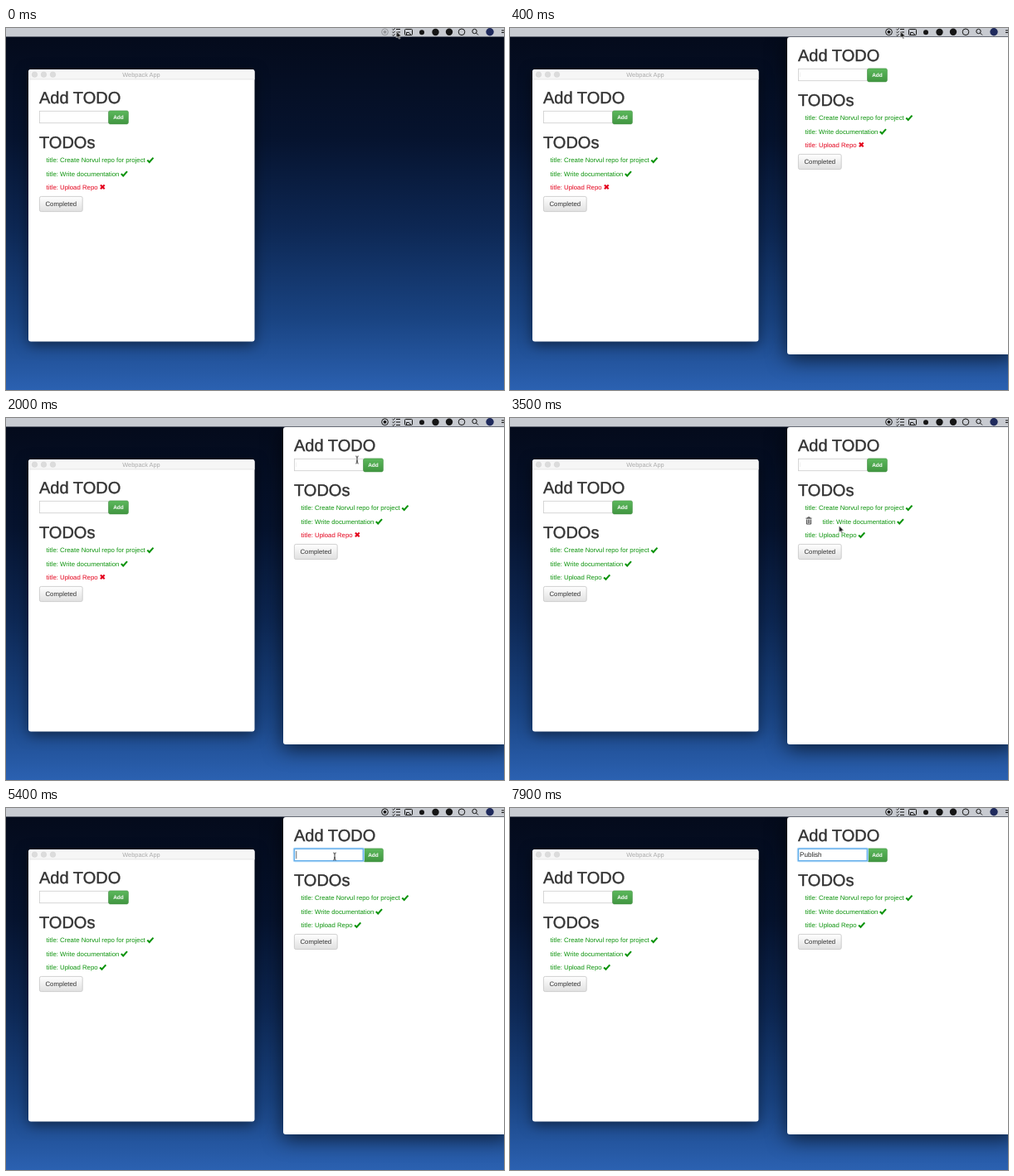
An HTML page that plays this animation: 600 px wide and 437 px high, repeating every 8 s.

```html
<!DOCTYPE html>
<html lang="en">
<head>
<meta charset="utf-8">
<title>Todo menu bar app</title>
<style>
html, body { margin: 0; width: 100%; height: 100%; overflow: hidden; }
svg { display: block; }
text { font: 7.8px "Liberation Sans", Arial, sans-serif; text-rendering: geometricPrecision; }
.h1 { font-size: 20px; fill: #333; stroke: #333; stroke-width: .4px; }
.green { color: #0b930b; }
.row { fill: currentColor; }
.mark { fill: none; stroke: currentColor; stroke-width: 2.1; }
.window { filter: drop-shadow(0 4px 8px rgba(0,0,0,.5)); }
.popup { filter: drop-shadow(0 5px 12px rgba(0,0,0,.65)); }

/* Every animated part shares one 8 s clock; most states switch hard. */
.a { animation: 8s step-end -20ms infinite; }
.show { animation-name: show; }
.record { animation-name: record; }
.pressed { animation-name: pressed; }
.status { animation-name: status; }
.cross { animation-name: cross; }
.check { animation-name: check; }
.upload { animation-name: upload; }
.write { animation-name: write; }
.bin-upload { animation-name: bin-upload; }
.bin-write { animation-name: bin-write; }
.focus { animation-name: focus; }
.type { animation-name: type; }
.caret { animation-name: caret; }
.ring { animation-name: ring; }
.arrow { animation-name: arrow; }
.beam { animation-name: beam; }
.pointer { animation-name: pointer; animation-timing-function: ease-in-out; }

@keyframes show { 0% { opacity: 0 } 5%, 100% { opacity: 1 } }
@keyframes record { 0% { opacity: .3 } 1.25%, 100% { opacity: 1 } }
@keyframes pressed { 0% { opacity: 0 } 2.5% { opacity: 1 } 5%, 100% { opacity: 0 } }
@keyframes status { 0% { color: #e3001b } 38.75%, 100% { color: #0b930b } }
@keyframes cross { 0% { opacity: 1 } 38.75%, 100% { opacity: 0 } }
@keyframes check { 0% { opacity: 0 } 38.75%, 100% { opacity: 1 } }
@keyframes upload { 0% { transform: none } 31.25% { transform: translateX(21px) } 43.75%, 100% { transform: none } }
@keyframes write { 0% { transform: none } 43.75% { transform: translateX(21px) } 45%, 100% { transform: none } }
@keyframes bin-upload { 0% { opacity: 0 } 31.25% { opacity: 1 } 43.75%, 100% { opacity: 0 } }
@keyframes bin-write { 0% { opacity: 0 } 43.75% { opacity: 1 } 45%, 100% { opacity: 0 } }
@keyframes focus { 0% { opacity: 0 } 53.75%, 100% { opacity: 1 } }
@keyframes type {
  0% { transform: none }
  71.25% { transform: translateX(5.5px) }
  73.75% { transform: translateX(10px) }
  76.25% { transform: translateX(14.5px) }
  78.75% { transform: translateX(16.3px) }
  81.25% { transform: translateX(18.1px) }
  83.75% { transform: translateX(22.2px) }
  86.25%, 100% { transform: translateX(27px) }
}
@keyframes caret {
  0% { opacity: 0 } 53.75% { opacity: 1 } 58.75% { opacity: 0 }
  65% { opacity: 1 } 92.5%, 100% { opacity: 0 }
}
@keyframes ring {
  0% { opacity: 0 } 1.25% { opacity: 1 } 5% { opacity: 0 }
  36.25% { opacity: 1 } 40% { opacity: 0 }
  52.5% { opacity: 1 } 56.25%, 100% { opacity: 0 }
}
@keyframes arrow {
  0% { opacity: 1 } 21.25% { opacity: 0 } 26.25% { opacity: 1 } 45%, 100% { opacity: 0 }
}
@keyframes beam {
  0% { opacity: 0 } 21.25% { opacity: 1 } 26.25% { opacity: 0 }
  45% { opacity: 1 } 71.25%, 100% { opacity: 0 }
}
@keyframes pointer {
  0%, 13.75% { transform: translate(470.5px, 4px) }
  22.5%, 26.25% { transform: translate(423px, 50.5px) }
  31.25%, 42.5% { transform: translate(441px, 138.5px) }
  43.75%, 44.25% { transform: translate(396.5px, 130px) }
  46.25%, 100% { transform: translate(396px, 58.5px) }
}
</style>
</head>
<body>
<svg width="600" height="437" viewBox="0 0 600 437">
  <defs>
    <linearGradient id="sky" x2="0" y2="1">
      <stop stop-color="#040a1a"/>
      <stop offset=".3" stop-color="#06132e"/>
      <stop offset=".55" stop-color="#0d2753"/>
      <stop offset=".8" stop-color="#194381"/>
      <stop offset="1" stop-color="#2b61b1"/>
    </linearGradient>
    <linearGradient id="leaf" x2="0" y2="1">
      <stop stop-color="#5cb85c"/><stop offset="1" stop-color="#419641"/>
    </linearGradient>
    <linearGradient id="steel" x2="0" y2="1">
      <stop stop-color="#fff"/><stop offset="1" stop-color="#e0e0e0"/>
    </linearGradient>

    <path id="tick" class="mark" d="M.8 .4L3.2 2.7L8 -2.6"/>
    <path id="times" class="mark" d="M.9 -2.4L5.7 2.4M5.7 -2.4L.9 2.4"/>
    <g id="bin" fill="none" stroke="#333">
      <path d="M0 1.6H7M2.3 1.4V.4H4.7V1.4" stroke-width="1"/>
      <path d="M.9 3V8.5H6.1V3M2.7 3V7.5M4.3 3V7.5" stroke-width=".9"/>
    </g>

    <g id="page">
      <text class="h1" x="40" y="91.2">Add TODO</text>
      <rect x="40.5" y="100.3" width="83" height="14.4" fill="#fff" stroke="#ccc" stroke-width=".8"/>
      <rect x="123.6" y="99.9" width="23.8" height="16" rx="1.8" fill="url(#leaf)" stroke="#3e8f3e" stroke-width=".6"/>
      <text x="135.5" y="110.3" text-anchor="middle" fill="#fff" style="font-size:6.5px;font-weight:700">Add</text>
      <text class="h1" x="40" y="145.4">TODOs</text>
      <g class="row green">
        <text x="48.6" y="162.2">title: Create Norvul repo for project</text>
        <use href="#tick" x="169.5" y="159.2"/>
      </g>
      <rect x="40.4" y="203.4" width="51.8" height="18.2" rx="2" fill="url(#steel)" stroke="#c4c4c4" stroke-width=".8"/>
      <text x="66.3" y="215.3" text-anchor="middle" fill="#333">Completed</text>
    </g>
    <g id="write" class="row">
      <text x="48.6" y="178.7">title: Write documentation</text>
      <use href="#tick" x="138" y="175.7"/>
    </g>
    <text id="upload" class="row" x="48.6" y="195">title: Upload Repo</text>
  </defs>

  <rect width="600" height="437" fill="url(#sky)"/>

  <!-- main window -->
  <g>
    <rect class="window" x="27" y="50" width="272.5" height="328.5" rx="3" fill="#fff"/>
    <path d="M27 62V53a3 3 0 0 1 3-3H296.500a3 3 0 0 1 3 3V62Z" fill="#f6f6f6"/>
    <path d="M27 62H299.500" stroke="#dedede" stroke-width=".7"/>
    <g fill="#dcdcdc" stroke="#cfcfcf" stroke-width=".4">
      <circle cx="34.500" cy="56.200" r="3.300"/>
      <circle cx="45.500" cy="56.200" r="3.300"/>
      <circle cx="56.500" cy="56.200" r="3.300"/>
    </g>
    <text x="163" y="58.900" text-anchor="middle" fill="#aaa" style="font-size:7.4px">Webpack App</text>
    <use href="#page"/>
    <use href="#write" class="green"/>
    <g class="a status">
      <use href="#upload"/>
      <g class="a cross"><use href="#times" x="113" y="191.800"/></g>
      <g class="a check"><use href="#tick" x="112.300" y="192"/></g>
    </g>
  </g>

  <!-- menu bar popup -->
  <g class="a show">
    <g transform="translate(307 -51)">
      <rect class="popup" x="27" y="62" width="273" height="383" rx="3" fill="#fff"/>
      <use href="#page"/>
      <g class="a bin-write"><use href="#bin" x="49.500" y="170.500"/></g>
      <g class="a write"><use href="#write" class="green"/></g>
      <g class="a bin-upload"><use href="#bin" x="49.500" y="187"/></g>
      <g class="a upload">
        <g class="a status">
          <use href="#upload"/>
          <g class="a cross"><use href="#times" x="113" y="191.800"/></g>
          <g class="a check"><use href="#tick" x="112.300" y="192"/></g>
        </g>
      </g>
      <text x="42" y="110.300" fill="#222" style="font-size:8.1px">Publish</text>
      <g class="a type">
        <rect x="42.200" y="101.500" width="30" height="12" fill="#fff"/>
        <path class="a caret" d="M42.800 102.800V112.300" stroke="#333" stroke-width=".7"/>
      </g>
      <g class="a focus" fill="none">
        <rect x="40" y="99.900" width="83.800" height="15.200" rx="1" stroke="#a9d3f6" stroke-width="2.400"/>
        <rect x="40.500" y="100.400" width="82.800" height="14.200" stroke="#62aeea" stroke-width="1.100"/>
      </g>
    </g>
  </g>

  <!-- menu bar -->
  <rect width="600" height="10.500" fill="#c8cbd1"/>
  <g fill="none" stroke="#151515">
    <g class="a record">
      <circle cx="456.500" cy="4.800" r="3.900"/>
      <circle cx="456.500" cy="4.800" r="1.900" fill="#151515" stroke="none"/>
    </g>
    <rect class="a pressed" x="463" width="15.500" height="10.500" fill="#1b5fc9" stroke="none"/>
    <path d="M470 1.500H475M470 5H475M470 8.500H475M465.500 1.400l1.100 1L468.600 .4M465.500 4.900l1.100 1L468.600 3.900M465.500 8.400l1.100 1L468.600 7.400" stroke-width="1"/>
    <rect x="480.500" y="1.500" width="9" height="7" rx="1"/>
    <path d="M482.500 8V5.500H485.500L488 8.500"/>
    <circle cx="549" cy="4.800" r="3.800"/>
    <circle cx="564.500" cy="4" r="2.700"/>
    <path d="M566.500 6L569 8.500M597 3H600M597 5.500H600"/>
  </g>
  <g fill="#151515">
    <circle cx="501" cy="5.200" r="3"/>
    <circle cx="517.500" cy="5" r="4.200"/>
    <circle cx="534" cy="4.800" r="4.200"/>
    <circle cx="583" cy="4.800" r="4.700" fill="#1f2a5c"/>
  </g>

  <!-- pointer -->
  <g class="a pointer">
    <g class="a ring" fill="none">
      <circle cy="2" r="9.500" stroke="#111" stroke-width="3.600"/>
      <circle cy="2" r="9.800" stroke="#fff" stroke-width="1.300"/>
    </g>
    <path class="a arrow" d="M0 0V8L1.800 6.400L3 9.200L4.300 8.600L3.100 5.900H5.600Z" fill="#111" stroke="#fff" stroke-width=".6"/>
    <path class="a beam" d="M-1.800 -4.300Q0 -4.300 0 -3Q0 -4.300 1.800 -4.300M0 -3.500V3.500M-1.800 4.300Q0 4.300 0 3Q0 4.300 1.800 4.300M-1 1.500H1" fill="none" stroke="#222" stroke-width=".9"/>
  </g>
</svg>
</body>
</html>
```
